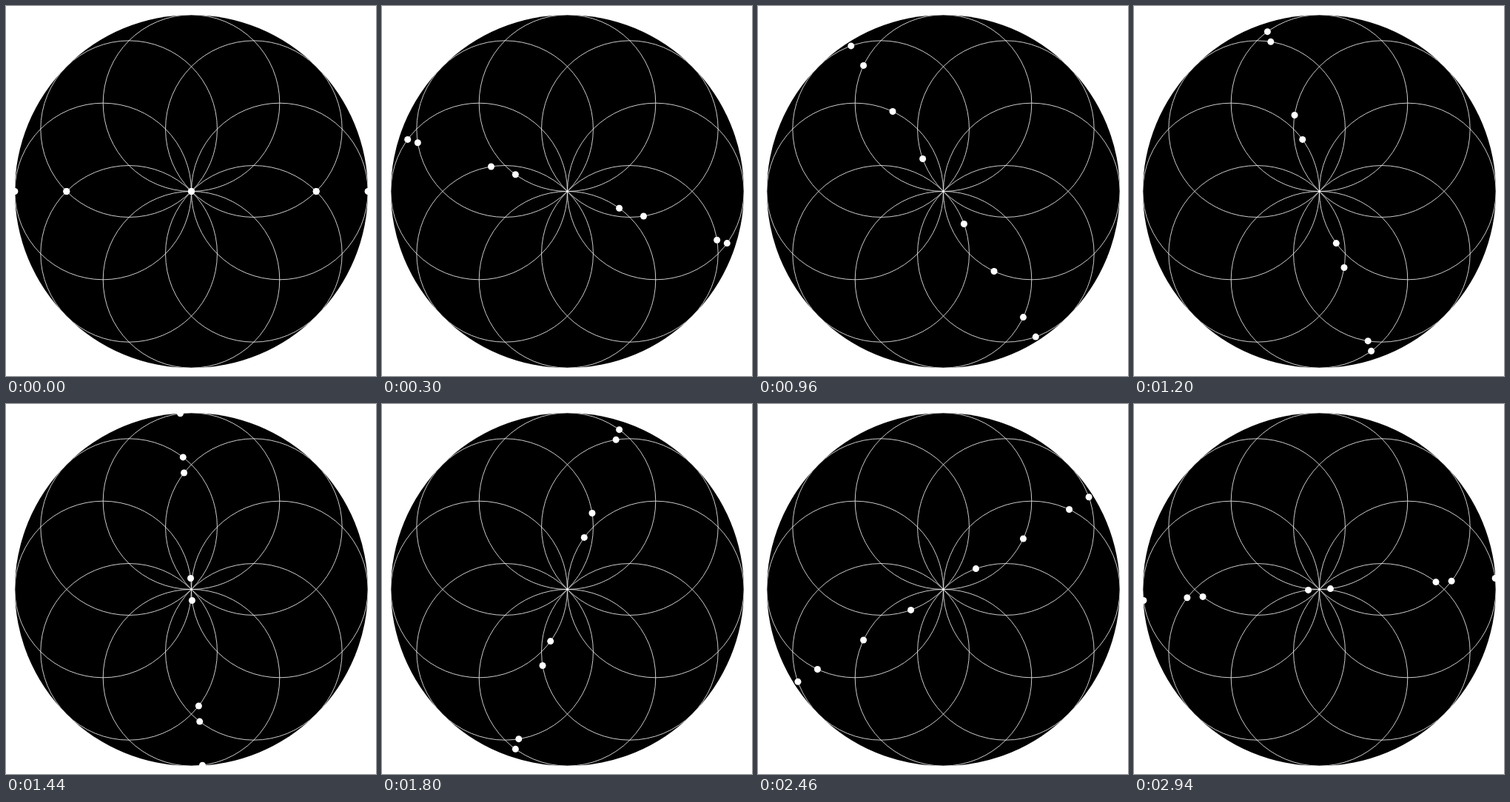
Animation, 500 px wide and 500 px high, one loop 3 s. Source, as an HTML page:

```html
<!DOCTYPE html>
<html lang="en">
<head>
<meta charset="utf-8">
<title>Rolling dots</title>
<style>
  html, body { margin: 0; width: 100%; height: 100%; overflow: hidden; background: #fff; }
  svg { display: block; width: 100vw; height: 100vh; }
</style>
</head>
<body>
<svg id="stage" viewBox="0 0 500 500"></svg>
<script>
const LOOP = 3000, STEP = 60;
const CENTER = 250.5, RADIUS = 238.6, COUNT = 8;
const stage = document.getElementById('stage');

function addCircle(x, y, r, style) {
  const circle = document.createElementNS('http://www.w3.org/2000/svg', 'circle');
  const attributes = { cx: x, cy: y, r, ...style };
  for (const name in attributes) circle.setAttribute(name, attributes[name]);
  stage.append(circle);
  return circle;
}

const angles = Array.from({ length: COUNT }, (_, k) => k * 2 * Math.PI / COUNT);

addCircle(CENTER, CENTER, RADIUS, { fill: '#000' });
for (const a of angles) {
  addCircle(CENTER + RADIUS / 2 * Math.cos(a), CENTER + RADIUS / 2 * Math.sin(a), RADIUS / 2,
    { fill: 'none', stroke: '#fff', 'stroke-width': 0.8 });
}
const dots = angles.map(() => addCircle(CENTER, CENTER, 4.5, { fill: '#fff' }));

// Each dot sits where a line turning about the center cuts its circle.
function draw(time) {
  const turn = Math.PI * Math.floor(time % LOOP / STEP) * STEP / LOOP;
  dots.forEach((dot, k) => {
    const distance = RADIUS * Math.cos(turn - angles[k]);
    dot.setAttribute('cx', CENTER + distance * Math.cos(turn));
    dot.setAttribute('cy', CENTER + distance * Math.sin(turn));
  });
}

const start = performance.now();
function tick() {
  draw(performance.now() - start);
  requestAnimationFrame(tick);
}
tick();
</script>
</body>
</html>
```
